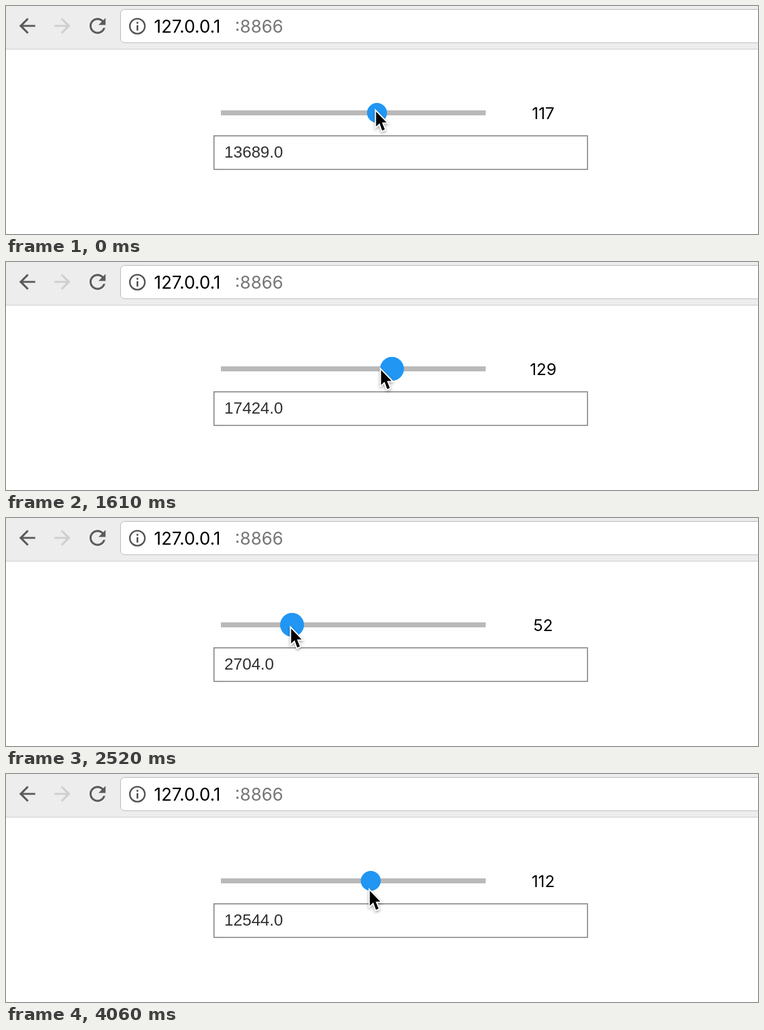
Recreate the animation shown at these times as an HTML page. Size 1204x367 px, loop 4.13 s.

```html
<!DOCTYPE html>
<html lang="en">
<head>
<meta charset="utf-8">
<title>Slider</title>
<style>
html, body { margin: 0; width: 100%; height: 100%; overflow: hidden; background: #fff; }
svg { display: block; width: 100vw; height: 100vh; }
.ui { font-family: Inter, Roboto, sans-serif; }
.field { font: 26px "Liberation Sans", Arial, sans-serif; fill: #303030; }
#cursor { filter: drop-shadow(0 2px 2px rgba(0, 0, 0, .35)); }
</style>
</head>
<body>
<svg viewBox="0 0 1204 367">
  <defs>
    <path id="arrow" d="M20 11H7.83l5.59-5.59L12 4l-8 8 8 8 1.41-1.41L7.83 13H20z"/>
    <path id="pointer" d="M0 0V24L5.6 18.8 9.8 30.5 14 28.8 9.4 17.6H16.8Z"/>
  </defs>

  <rect width="1204" height="69" fill="#ededed"/>
  <rect y="69" width="1204" height="1" fill="#cbcbcb"/>
  <use href="#arrow" transform="translate(14.8 12.8) scale(1.6)" fill="#5a5a5a"/>
  <use href="#arrow" transform="translate(109.4 12.8) scale(-1.6 1.6)" fill="#cfcfcf"/>
  <path transform="translate(127.4 12.8) scale(1.6)" fill="#5a5a5a" d="M17.65 6.35C16.2 4.9 14.21 4 12 4c-4.42 0-7.99 3.58-7.99 8s3.57 8 7.99 8c3.73 0 6.84-2.55 7.73-6h-2.08c-.82 2.33-3.04 4-5.65 4-3.31 0-6-2.69-6-6s2.69-6 6-6c1.66 0 3.14.69 4.22 1.78L13 11h7V4z"/>

  <rect x="183.5" y="5.5" width="1040" height="53.5" rx="6" fill="#fff" stroke="#b8b8b8"/>
  <g fill="#555">
    <circle cx="210.3" cy="32.5" r="12" fill="none" stroke="#555" stroke-width="2.6"/>
    <rect x="209" y="25.5" width="2.8" height="3"/>
    <rect x="209" y="31" width="2.8" height="8.5"/>
  </g>
  <text class="ui" y="43" font-size="28"><tspan x="237">127.0.0.1</tspan><tspan x="366.5" fill="#777">:8866</tspan></text>

  <rect x="344" y="168" width="424" height="8" fill="#b9b9b9"/>
  <circle id="handle" cy="172" fill="#2196f3"/>
  <text id="label" class="ui" x="860" y="182" font-size="26" text-anchor="middle"></text>

  <rect x="333" y="209" width="598" height="54" fill="#fff" stroke="#999" stroke-width="2"/>
  <text id="square" class="field" x="349.5" y="244"></text>

  <g id="cursor">
    <use href="#pointer" fill="#fff" stroke="#fff" stroke-width="4"/>
    <use href="#pointer"/>
  </g>
</svg>
<script>
const LOOP = 4130, STEP = 70;
const [handle, label, square, cursor] =
  ["handle", "label", "square", "cursor"].map(id => document.getElementById(id));

// time, slider value, change per step
const drag = [
  [560, 117, 0], [1120, 157, 0], [1610, 129, -8], [2170, 66, -6],
  [2520, 52, 0], [2940, 54, 0], [3010, 54, 0], [3220, 87.8, .8],
  [3290, 89, .5], [3850, 112, 0]
];
// time, pointer height
const drift = [[0, 169], [1120, 170], [1610, 173], [2170, 177], [2940, 178], [3290, 182], [4060, 187]];

// Cubic Hermite curve; without slopes, a straight line
function sample(keys, t) {
  const last = keys[keys.length - 1];
  if (t <= keys[0][0]) return keys[0][1];
  if (t >= last[0]) return last[1];
  const i = keys.findIndex(k => k[0] > t);
  const [t0, a, ma] = keys[i - 1], [t1, b, mb] = keys[i];
  const s = (t - t0) / (t1 - t0), n = (t1 - t0) / STEP;
  if (ma === undefined) return a + (b - a) * s;
  return a + (b - a) * s * s * (3 - 2 * s)
    + n * s * (1 - s) * (ma * (1 - s) - mb * s);
}

const toX = v => 348 + 2.1 * v;

function draw(now) {
  const t = Math.floor((now % LOOP) / STEP) * STEP;
  const value = Math.round(sample(drag, t));
  const hover = t >= 70 && t < 4060;

  handle.setAttribute("cx", 2 * Math.round(toX(value) / 2));
  handle.setAttribute("r", hover ? 19.2 : 16);
  label.textContent = value;

  // The result trails the slider, the slider trails the pointer
  square.textContent = (Math.round(sample(drag, t - 25)) ** 2).toFixed(1);
  const x = Math.round(toX(sample(drag, t + STEP)) - 1.7);
  const y = Math.round(sample(drift, t));
  cursor.setAttribute("transform", `translate(${x + .5} ${y + 1})`);
}

const start = performance.now();
function tick() {
  draw(performance.now() - start);
  requestAnimationFrame(tick);
}
tick();
</script>
</body>
</html>
```
